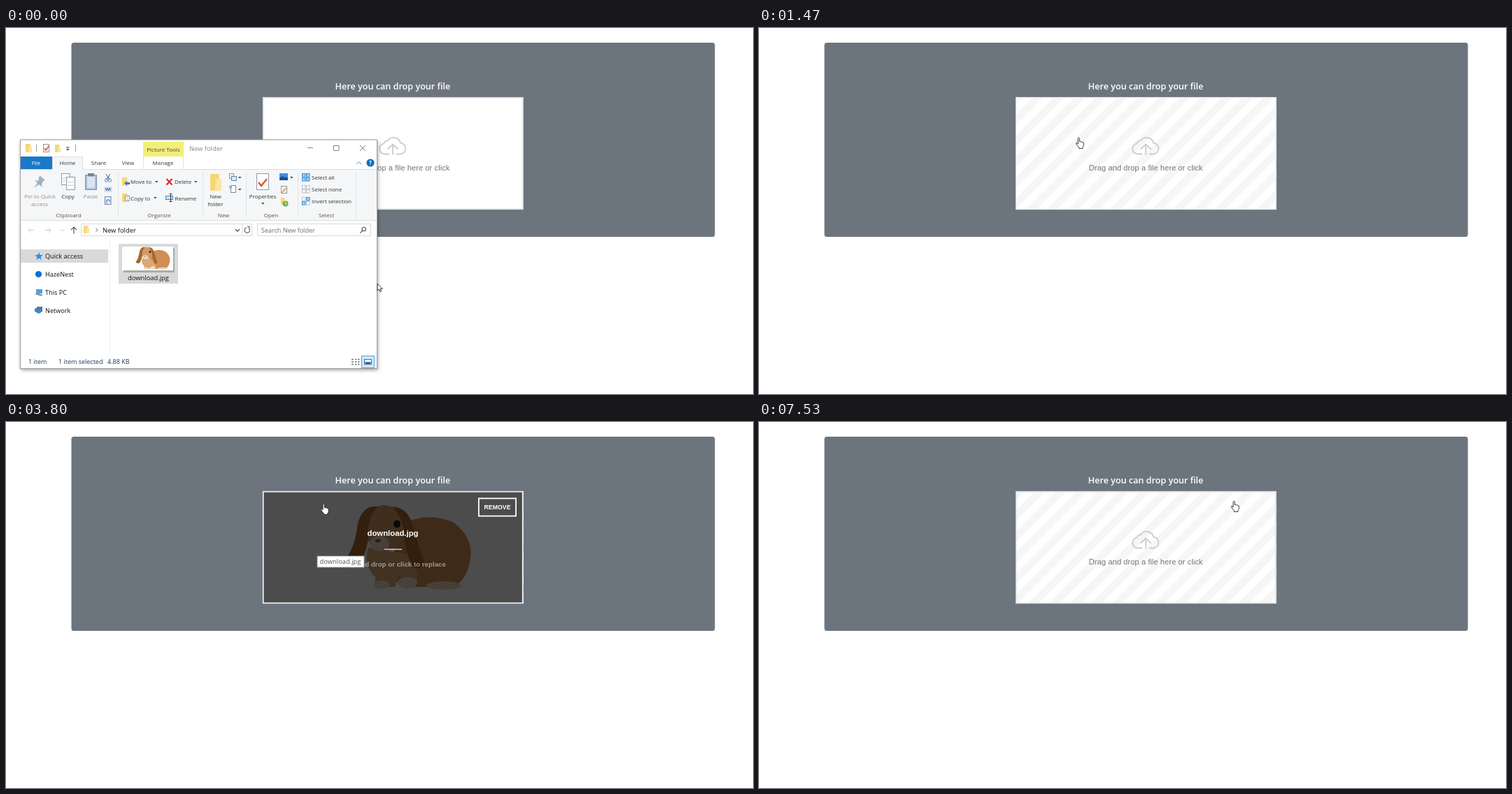
These frames come from a looping animation (1068 px wide and 524 px high, 7590 ms). An HTML page:

```html
<!DOCTYPE html>
<html lang="en">
<head>
<meta charset="utf-8">
<title>File drop</title>
<style>
html, body { margin: 0; width: 100%; height: 100%; overflow: hidden; background: #fff; }
svg { display: block; width: 100%; height: 100%; }
text { white-space: pre; }
.ui { font-family: "Open Sans", "Noto Sans", sans-serif; }
.arial { font-family: "Liberation Sans", Arial, sans-serif; }
</style>
</head>
<body>
<svg id="stage" viewBox="0 0 1068 524"></svg>
<script>
const LOOP = 7590, FPS = 15;
const DROP = 1400, FADE = 1465, TIP_ON = 2130, TIP_OFF = 5530, CLEAR = 6060;

// markup helpers
const rect = (x, y, w, h, fill, extra = '') =>
  `<rect x="${x}" y="${y}" width="${w}" height="${h}" fill="${fill}" ${extra}/>`;
const box = (x, y, w, h, fill, stroke, sw = 1) =>
  rect(x + sw / 2, y + sw / 2, w - sw, h - sw, fill, `stroke="${stroke}" stroke-width="${sw}"`);
const fill = (d, color) => `<path d="${d}" fill="${color}"/>`;
const line = (d, color, w = 1) => `<path d="${d}" fill="none" stroke="${color}" stroke-width="${w}"/>`;
const oval = (x, y, rx, ry, color) => `<ellipse cx="${x}" cy="${y}" rx="${rx}" ry="${ry}" fill="${color}"/>`;
const text = (x, y, s, size = 8, color = '#333', extra = '', font = 'ui') =>
  `<text class="${font}" x="${x}" y="${y}" font-size="${size}" fill="${color}" ${extra}>${s}</text>`;
const mid = (x, y, s, size, color, extra = '', font) =>
  text(x, y, s, size, color, 'text-anchor="middle" ' + extra, font);
const group = (id, body, extra = '') => `<g id="${id}" ${extra}>${body}</g>`;

const folder = (x, y, w, h) =>
  rect(x, y, w * .8, h, '#f7d774') + fill(`M${x + w * .55} ${y + h * .3}H${x + w}V${y + h}H${x + w * .4}Z`, '#fbe6a2');
const sheet = (x, y, w, h, edge = '#8a97a5') =>
  box(x, y, w, h, '#fff', edge) + line(`M${x + 2} ${y + h * .4}h${w - 4}M${x + 2} ${y + h * .65}h${w - 4}`, '#9dbbd8', .8);
const caret = (x, y) => fill(`M${x} ${y}h4.6l-2.3 2.5z`, '#444');

const bunny = group('bunny',
  fill('M560 150Q600 126 640 144Q668 165 664 195Q660 225 640 236H590Q560 238 550 220Z', '#cf8f55') +
  oval(626, 234, 25, 6, '#edd5bb') +
  fill('M518 180Q510 205 528 222V236H556L560 220 585 232Q594 215 576 190Z', '#dba774') +
  oval(537, 233, 12, 6, '#f0dcc6') + oval(574, 230, 14, 8, '#f0dcc6') +
  oval(541, 152, 28, 33, '#d39a63') + oval(534, 174, 14, 11, '#efd9c2') +
  fill('M532 121Q508 118 502 150Q499 180 483 200Q492 212 505 204Q520 180 518 150Q520 132 532 121Z', '#a8682f') +
  fill('M552 121Q575 122 582 150Q590 180 598 200Q596 212 584 209Q570 190 570 160Q566 135 552 121Z', '#a8682f') +
  oval(559, 146, 5, 5.5, '#2a1a12') + oval(532, 170, 4, 2.5, '#9a6248'));

function titleBar() {
  return folder(28, 166, 9, 12) + line('M43.5 167v10M99.5 167v10', '#999') +
    box(53, 166, 9, 12, '#fff', '#8a97a5') + line('M55 172l2 3 4-6', '#d9532c', 1.5) +
    folder(70, 167, 8, 11) + line('M86 171h4.5', '#333') + caret(86, 173) +
    rect(196, 163, 58, 21, '#f2ee78') + mid(225, 176.5, 'Picture Tools', 8, '#444') +
    text(262, 175.5, 'New folder', 9.35, '#8a8a8a') +
    line('M431 171.5h8M468.5 168.5h7.5v7h-7.5zM506 168l8 8M514 168l-8 8', '#777', .9);
}

function ribbon() {
  let s = rect(21, 202, 509, 74, '#f5f6f7') + line('M21 202.5H530M21 275.5H530', '#dcddde') +
    rect(21, 184, 45, 18, '#1979ca') + mid(43, 196, 'File', 8, '#fff') +
    fill('M66 203V184.5H110V203Z', '#f5f6f7') + line('M66.5 202V184.5H109.5V202', '#dcddde') +
    line('M196.5 184V202M253.5 184V202', '#e4e4e4') +
    mid(88, 196, 'Home') + mid(132.5, 196, 'Share') + mid(174.5, 196, 'View') + mid(224.5, 196, 'Manage') +
    line('M501 195l3.5-3.5 3.5 3.5', '#777', .9) + oval(521, 193, 5.6, 5.6, '#0f6cbd') +
    mid(521, 196, '?', 8, '#fff', 'font-weight="700"') +
    line('M160.5 206V272M281.5 206V272M343.5 206V272M417.5 206V272M500.5 206V272', '#e2e3e4');
  [[89.5, 'Clipboard'], [219, 'Organize'], [311, 'New'], [379, 'Open'], [458, 'Select']]
    .forEach(([x, name]) => s += mid(x, 271, name, 8, '#555'));

  // clipboard
  s += fill('M48 211l8 7-3 1-2 5 1 4-5-4-7 5 5-7-4-4 5 1z', '#9fb0c0') +
    mid(48.5, 244, 'Pin to Quick', 8, '#8e8e8e') + mid(48, 255, 'access', 8, '#8e8e8e') +
    sheet(79, 208, 13, 17) + sheet(86, 213, 13, 19) + mid(88.5, 244, 'Copy') +
    box(113, 210, 17, 22, '#a9bfd6', '#7f97b0') + rect(116, 213, 11, 16, '#d9e6f2') + rect(117, 208, 9, 4, '#71859a') +
    mid(121, 244, 'Paste', 8, '#8e8e8e') +
    line('M143 209l5 8M149 209l-5 8', '#3c5f86') + line('M142 218a1.7 1.7 0 1 0 3 0 1.7 1.7 0 1 0-3 0M147 218a1.7 1.7 0 1 0 3 0 1.7 1.7 0 1 0-3 0', '#2b7cd3') +
    rect(140.5, 227, 11, 8, '#d4e3f1') + line('M142 229l1.5 4 1.5-4 1.5 4 1.5-4M149 229v4', '#365f8c', .9) +
    box(141, 241, 9.5, 12, '#e8f0f8', '#6b87a6') + line('M144 251v-5h4v3', '#2b6fb5');

  // organize
  s += folder(166, 214, 9, 12) + fill('M169 222l4-3v2h4v3h-4v2z', '#2f7fd0') + text(178, 223, 'Move to') + caret(213, 219) +
    folder(166, 237, 9, 12) + sheet(170, 240, 7, 8) + text(178, 246.5, 'Copy to') + caret(211, 242) +
    line('M229.5 216l8 8.5M237.5 216l-8 8.5', '#d9232a', 2) + text(241, 223, 'Delete') + caret(269, 219) +
    box(228, 240, 11, 6, '#cfe4f7', '#4b83b8') + line('M235.5 237.5v11M233.5 237.5h4M233.5 248.5h4', '#333') + text(241.5, 246.5, 'Rename');

  // new and open
  s += folder(292, 209, 16, 24) + mid(299.5, 244, 'New') + mid(299.5, 255, 'folder') +
    sheet(319, 208, 7, 8) + box(322, 212, 8, 7, '#dbe9f6', '#5f82a8') + caret(332, 213) +
    box(321, 225, 8, 11, '#fff', '#7c8ca0') + fill('M319 226h4v4h-4z', '#8bb8e3') + caret(332, 230) +
    box(358, 208, 18, 24, '#fff', '#8f9aa8') + line('M361 221l4 5 8-10', '#d9532c', 2.4) +
    mid(367, 244, 'Properties') + caret(365, 250) +
    rect(391, 208, 12, 10, '#3f8fdc') + fill('M391 218v-3l4-3 3 2 2-1 3 2v3z', '#184f8d') + caret(406, 213) +
    sheet(393, 226, 9, 11) + line('M394 236l7-7', '#e0a03c', 1.6) +
    folder(393, 243, 7, 9) + oval(399.5, 251.5, 4, 4, '#6fb04d') + line('M399.5 249v3h2', '#fff', .9);

  // select
  ['Select all', 'Select none', 'Invert selection'].forEach((name, i) => {
    const y = 208 + i * 17;
    for (let k = 0; k < 4; k++) {
      const on = i === 0 || (i === 2 && (k === 1 || k === 2));
      s += box(423 + (k % 2) * 6, y + (k >> 1) * 6, 5.5, 5.5, on ? '#9fd0f5' : '#fff', on ? '#2f86cf' : '#b3bcc6', .9);
    }
    s += text(437, y + 8.7, name);
  });
  return s;
}

function folderView() {
  let s = line('M40 289.5h-8M35.5 286l-3.5 3.5 3.5 3.5M56 289.5h8M60.5 286l3.5 3.5-3.5 3.5', '#c9c9c9', .9) +
    line('M78 288.5l2.3 2.3 2.3-2.3', '#bbb', .9) + line('M97 294.5v-9M93 289l4-4 4 4', '#555', 1.2) +
    box(107, 280, 245, 18, '#fff', '#d9d9d9') + line('M337.5 280v18', '#e2e2e2') +
    folder(111, 283, 8, 11) + line('M128.5 286.5l2.3 2.5-2.3 2.5', '#555', .9) + text(138, 292.5, 'New folder', 9.35, '#111') +
    line('M328 288l3 3.2 3-3.2', '#444', 1.1) + line('M347.8 287.5a3.7 3.7 0 1 1-4-1.5M345 284l3 .5-.5 3.5', '#555', 1.1) +
    box(359, 280, 163, 18, '#fff', '#d9d9d9') + text(365, 292.5, 'Search New folder', 9, '#6d6d6d') +
    line('M509 288a2.7 2.7 0 1 0 5.4 0 2.7 2.7 0 1 0-5.4 0M509.7 290l-3.5 3.6', '#555', 1.1) +
    rect(21, 317, 125, 19, '#d9d9d9') + line('M148.5 304V466', '#f0f0f0') +
    fill('M47 321l1.6 4 4.4.2-3.5 2.6 1.2 4.2-3.7-2.4-3.7 2.4 1.2-4.2-3.5-2.6 4.4-.2z', '#2f8fe0') +
    oval(46.5, 352.5, 4.6, 4.6, '#0f70d0') +
    fill('M43 374h9v6h-9z', '#4aa3e0') + fill('M41 381l4-2 8 3-3 2z', '#8a98a8') +
    fill('M41 402l6-3 5 2v5l-5 3-6-3z', '#3c8bcb') + fill('M44 399h8v5h-8z', '#5a7894');
  ['Quick access', 'HazeNest', 'This PC', 'Network'].forEach((name, i) => s += text(56, 330.3 + i * 25.8, name, 9.15, '#111'));
  s += rect(161, 309, 85, 57, '#d9d9d9', 'id="item"') +
    rect(168, 315, 73, 35, '#000', 'opacity=".22"') + rect(166, 313, 73, 34, '#fff') +
    '<use href="#bunny" transform="translate(55 281) scale(.27)"/>' +
    mid(203.5, 360.5, 'download.jpg', 9.35, '#111') +
    text(32, 481.3, '1 item', 9, '#1e395b') + text(75, 481.3, '1 item selected', 9, '#1e395b') + text(145, 481.3, '4.88 KB', 9, '#1e395b');
  for (let i = 0; i < 3; i++) s += line(`M494 ${474.5 + i * 3.5}h3M499 ${474.5 + i * 3.5}h2.5M503 ${474.5 + i * 3.5}h2.5`, '#777', 1.6);
  return s + box(508, 469, 19, 18, '#cce8ff', '#4fa9e6') + box(512, 474, 11, 8, '#fff', '#667') + rect(513.5, 478, 8, 3, '#3c6ea0');
}

const explorer = group('explorer',
  rect(20, 160, 511, 328, '#fff', 'filter="url(#soft)"') +
  box(20, 159.5, 511, 328.5, '#fff', '#9b9b9b') + titleBar() + ribbon() + folderView());

const cloud = line('M548 180.5h-6.5a7.6 7.6 0 0 1-1-15.1q.6-4.2 5-3.8a10.2 10.2 0 0 1 18.5 3a8 8 0 0 1 .5 15.9H558', '#ccc', 1.8) +
  line('M553 181.5V166.5M545.5 173.5l7.5-7 7.5 7', '#ccc', 1.8);

const zone = rect(367, 99, 372.5, 161, '#fff') + rect(367, 99, 372.5, 161, 'url(#stripes)', 'id="stripeFill"') +
  cloud + mid(553, 204.4, 'Drag and drop a file here or click', 11.28, '#777', '', 'arial') +
  group('preview',
    rect(368, 100, 370.5, 159, '#fff') + bunny + rect(368, 100, 370.5, 159, '#000', 'opacity=".7"') +
    mid(553, 163.3, 'download.jpg', 11.33, '#fff', 'font-weight="700"', 'arial') +
    rect(541, 181.6, 25, 1.5, '#fff', 'opacity=".75"') +
    mid(553, 207, 'Drag and drop or click to replace', 9.73, '#fff', 'font-weight="700" opacity=".5"', 'arial')) +
  rect(367.75, 99.75, 371, 159.5, 'none', 'id="edge" stroke="#e0e2e4" stroke-width="1.7"') +
  group('remove', box(675, 108.5, 55, 27, 'none', '#fff', 1.8) +
    mid(702.5, 125.2, 'REMOVE', 8.77, '#fff', 'font-weight="700"', 'arial'));

const ghost = group('ghost',
  rect(-31, -44, 84, 85, '#000', 'opacity=".25" filter="url(#soft)"') +
  rect(-31, -44, 84, 85, '#e4f2f8', 'opacity=".78"') +
  rect(-30.5, -43.5, 83, 84, 'none', 'stroke="#c3dfec" opacity=".8"') +
  rect(-26, 0, 63, 30, '#fff', 'opacity=".85"') +
  '<use href="#bunny" opacity=".85" transform="translate(-140 -32) scale(.26)"/>');
const badge = group('badge', box(19, 41, 44, 16, '#fff', '#9a9a9a') +
  line('M23 49h9M27.5 44.5v9', '#1a56b0', 1.8) + text(35.5, 52.8, 'Copy', 9.1, '#1a4fa3'));

document.getElementById('stage').innerHTML = `<defs>
  <filter id="soft" x="-10%" y="-10%" width="125%" height="125%"><feDropShadow dx="1" dy="2" stdDeviation="2.5" flood-opacity=".35"/></filter>
  <pattern id="stripes" width="30" height="30" patternUnits="userSpaceOnUse">${fill('M15 0H30L0 30V15ZM30 15V30H15Z', '#f6f6f6')}</pattern>
  </defs>` +
  rect(93.5, 21, 920, 278, '#6c757d', 'rx="3.5"') +
  mid(553, 88, 'Here you can drop your file', 12.6, '#fff', 'font-weight="600"') +
  zone + explorer +
  group('tip', box(444.5, 191.5, 68, 17, '#fff', '#777', .8) + mid(478, 203.2, 'download.jpg', 9.35, '#555')) +
  group('cursor', ghost + badge +
    group('arrow', '<path d="M0 0V10L2.4 8 4 11.8 5.6 11 4 7.4H7.2Z" fill="#fff" stroke="#222" stroke-width=".9"/>') +
    group('hand', '<path transform="translate(-4 0)" d="M3 9V1.5Q3 .4 4.1 .4T5.2 1.5V5.8Q6.2 4.9 7.2 6Q8.4 5.3 9.2 6.5Q11.2 6.2 11.2 8V10.5Q11 12.5 9.8 13.8V15.4H4.4V14Q3 12.5 1.2 10Q-.2 8 .6 7.4Q1.6 7 3 9Z" fill="#fff" stroke="#222" stroke-width=".9"/>'));

// cursor path: time, x, y
const path = [
  [0, 531, 366], [70, 529, 365], [300, 350, 350], [530, 215, 330], [600, 215, 330], [800, 330, 287],
  [1130, 533, 194], [1330, 476, 162], [1450, 458, 157], [1670, 450, 157], [1950, 447, 165], [2200, 447, 166],
  [2330, 455, 172], [2470, 489, 180], [2730, 610, 140], [2870, 684, 126], [3000, 660, 178], [3130, 600, 195],
  [3270, 587, 188], [3470, 535, 110], [3600, 490, 85], [3800, 454, 117], [4000, 470, 132], [4130, 500, 116],
  [4400, 591, 116], [4600, 545, 168], [4800, 480, 168], [5000, 474, 174], [5130, 498, 178], [5330, 499, 178],
  [5530, 610, 140], [5730, 719, 95], [5930, 703, 117], [6060, 703, 117], [6330, 640, 168],
  [6600, 520, 182], [6800, 486, 186], [6930, 486, 184], [7270, 600, 150], [7530, 679, 113], [7590, 679, 113]];

function cursorAt(t) {
  let i = 0;
  while (i < path.length - 2 && path[i + 1][0] <= t) i++;
  const a = path[i], b = path[i + 1], p = path[i - 1] || a, n = path[i + 2] || b;
  const span = b[0] - a[0], u = (t - a[0]) / span;
  return [1, 2].map(k => {
    if (a[k] === b[k]) return a[k];
    // flatten the slope at turning points so the path never overshoots
    const slope = (l, m, r) => (m[k] - l[k]) * (r[k] - m[k]) > 0 ? (r[k] - l[k]) / (r[0] - l[0]) * span : 0;
    const ma = slope(p, a, b), mb = slope(a, b, n), u2 = u * u, u3 = u2 * u;
    return (2 * u3 - 3 * u2 + 1) * a[k] + (u3 - 2 * u2 + u) * ma + (3 * u2 - 2 * u3) * b[k] + (u3 - u2) * mb;
  });
}

const el = id => document.getElementById(id);
const show = (id, on) => el(id).setAttribute('display', on ? 'inline' : 'none');
const clamp = v => Math.max(0, Math.min(1, v));

function draw(ms) {
  const t = Math.floor((ms + 4) * FPS / 1000) * 1000 / FPS;
  const [x, y] = cursorAt(t);
  const dropped = t >= DROP, loaded = t >= FADE && t < CLEAR;
  const dragging = t > 610 && !dropped;
  const overItem = x > 161 && x < 246 && y > 309 && y < 366;
  const inWindow = x < 531 && y > 160;

  show('explorer', !dropped);
  show('ghost', dragging);
  show('badge', dragging && !inWindow);
  show('arrow', !dropped);
  show('hand', dropped);
  show('stripeFill', dropped);
  show('preview', loaded);
  show('remove', loaded);
  show('tip', t >= TIP_ON && t < TIP_OFF);
  el('item').setAttribute('fill', overItem ? '#cce8ff' : '#d9d9d9');
  el('preview').setAttribute('opacity', .5 - Math.cos(Math.PI * clamp((t - FADE) / 400)) / 2);
  el('remove').setAttribute('opacity', clamp((t - FADE) / 150));
  el('edge').setAttribute('stroke', loaded ? '#f0f0f0' : '#e0e2e4');
  el('stripes').setAttribute('patternTransform', `translate(${369 + t * .045 % 30} 101)`);
  el('cursor').setAttribute('transform', `translate(${Math.round(x)} ${Math.round(y)})`);
}

const start = performance.now();
function tick() {
  draw((performance.now() - start) % LOOP);
  requestAnimationFrame(tick);
}
tick();
</script>
</body>
</html>
```
